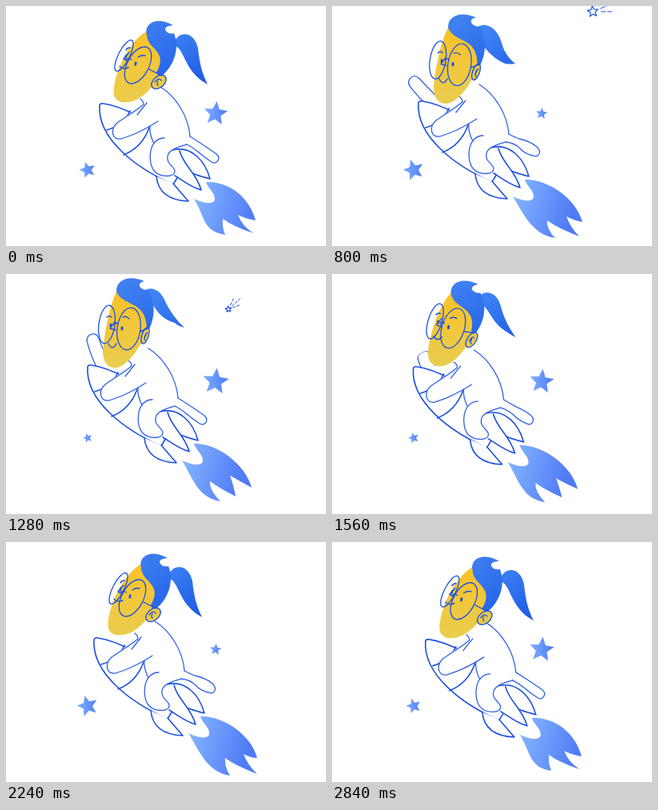
An HTML page with a canvas for the animation above (2880 ms loop, 400 by 300 pixels).

```html
<!DOCTYPE html>
<html lang="en">
<head>
<meta charset="utf-8">
<title>Rocket ride</title>
<style>
html, body { margin: 0; width: 100%; height: 100%; overflow: hidden; background: #fff; }
canvas { display: block; width: 100vw; height: 100vh; }
</style>
</head>
<body>
<canvas width="400" height="300"></canvas>
<script>
const ctx = document.querySelector('canvas').getContext('2d');
const LOOP = 2880, STEP = 40;
const KEY_TIMES = [0, 320, 800, 1280, 1840, 2240];
const DARK = '#1c50e0', LINE = '#3060e6', NUMBER = /-?\d+(\.\d+)?/g;

// Smooth periodic curve through the given values.
function curve(values, t, times = KEY_TIMES) {
  const n = times.length;
  let i = n - 1;
  while (times[i] > t) i--;
  const time = k => times[(k + n) % n] + LOOP * Math.floor(k / n);
  const value = k => values[(k + n) % n];
  const slope = k => (value(k + 1) - value(k - 1)) / (time(k + 1) - time(k - 1));
  const span = time(i + 1) - time(i), u = (t - time(i)) / span;
  const s = u * u * (3 - 2 * u);
  return value(i) * (1 - s) + value(i + 1) * s +
    span * u * (1 - u) * (slope(i) * (1 - u) - slope(i + 1) * u);
}

const clamp = v => Math.max(0, Math.min(1, v));
const lerp = (a, b, m) => a + (b - a) * m;
const numbers = path => path.match(NUMBER).map(Number);

function blend(a, b, m) {
  const target = numbers(b);
  let i = 0;
  return a.replace(NUMBER, v => lerp(+v, target[i++], m).toFixed(2));
}

function morph(poses, t) {
  const lists = poses.map(numbers);
  let i = 0;
  return poses[0].replace(NUMBER, () => {
    const v = curve(lists.map(list => list[i]), t);
    i++;
    return v.toFixed(2);
  });
}

function shape(path, fill, stroke, width = 1.3) {
  const p = new Path2D(path);
  if (fill) { ctx.fillStyle = fill; ctx.fill(p); }
  if (stroke) { ctx.strokeStyle = stroke; ctx.lineWidth = width; ctx.stroke(p); }
}

function gradient(x0, y0, x1, y1, from, to) {
  const g = ctx.createLinearGradient(x0, y0, x1, y1);
  g.addColorStop(0, from);
  g.addColorStop(1, to);
  return g;
}

function oval(a, b, m, fill, width = 1.3) {
  const [x, y, rx, ry, angle] = a.map((v, i) => lerp(v, b[i], m));
  ctx.beginPath();
  ctx.ellipse(x, y, rx, ry, angle * Math.PI / 180, 0, 7);
  if (fill) { ctx.fillStyle = fill; ctx.fill(); }
  if (width) { ctx.strokeStyle = DARK; ctx.lineWidth = width; ctx.stroke(); }
}

function star(x, y, r, degrees, outline) {
  ctx.beginPath();
  for (let i = 0; i < 10; i++) {
    const a = i * Math.PI / 5 + (degrees - 90) * Math.PI / 180;
    const d = i % 2 ? r * 0.45 : r;
    ctx.lineTo(x + d * Math.cos(a), y + d * Math.sin(a));
  }
  ctx.closePath();
  if (outline) {
    ctx.strokeStyle = DARK;
    ctx.lineWidth = 1.2;
    ctx.stroke();
  } else {
    ctx.fillStyle = gradient(x - r, y, x + r, y, '#80b2ff', '#4c7af5');
    ctx.fill();
  }
}

function twinklingStars(t) {
  const times = [...KEY_TIMES, 2720];
  star(262, 134.5, curve([15.5, 11.8, 7.5, 17, 12.5, 7.5, 17], t, times), 6);
  star(102, 205, curve([10.5, 11.8, 13.5, 6, 9.5, 13.5, 7], t, times), -16);
}

function shootingStar(t) {
  if (t < 480 || t > 1480) return;
  const u = (t - 800) / 480, x = 326 - 48 * u, y = 7 + 37 * u;
  const r = Math.max(0.5, 7 - 3 * u);
  star(x, y, r, -6, true);
  ctx.strokeStyle = DARK;
  ctx.lineWidth = 1;
  ctx.setLineDash([r * 0.8, 2.2]);
  for (const spread of [-22, 0, 22]) {
    const a = (-22 - 20 * u + spread) * Math.PI / 180;
    const c = Math.cos(a), s = Math.sin(a), end = r * (spread ? 3.6 : 5);
    ctx.beginPath();
    ctx.moveTo(x + r * 1.5 * c, y + r * 1.5 * s);
    ctx.lineTo(x + end * c, y + end * s);
    ctx.stroke();
  }
  ctx.setLineDash([]);
}

// Three flame tips and the two notches between them.
const FLAME = [
  '312 268 290 261 309 284 271 266 274 286',
  '315 273 294 264 308 291 272 271 277 291',
  '313 270 293 263 309 288 269 268 279 290',
  '307 267 280 252 287 278 255 259 268 284',
  '309 271 284 261 294 283 258 265 268 288',
  '314 270 297 265 314 290 274 270 280 292'
];

function flame(t, dx, dy) {
  const [ax, ay, bx, by, cx, cy, ex, ey, fx, fy] = numbers(morph(FLAME, t));
  const p = (x, y) => `${x + dx} ${y + dy}`;
  shape(`M${p(250, 220)} C${p(278, 219)} ${ax - 8} ${ay - 30} ${ax} ${ay}
    Q${bx + 9} ${by + 5} ${bx} ${by} Q${bx + 5} ${by + 14} ${cx} ${cy}
    Q${ex + 12} ${ey + 9} ${ex} ${ey} Q${ex - 1} ${ey + 11} ${fx} ${fy}
    C${fx - 28} ${fy - 4} ${p(249, 264)} ${p(235, 241)}
    C${p(247, 247)} ${p(261, 249)} ${p(261, 241)} C${p(261, 233)} ${p(252, 228)} ${p(250, 220)} Z`,
    gradient(235 + dx, 245 + dy, 308 + dx, 266 + dy, '#82b4ff', '#507bf5'));
}

function wavingArm(t) {
  const reach = clamp(curve([0, 0, 1, 1, 0, 0], t));
  if (reach < 0.02) return;
  ctx.save();
  ctx.translate(138, 124);
  ctx.rotate(curve([30, 30, 44, 66, 50, 30], t) * Math.PI / 180);
  ctx.scale(reach, 1);
  shape('M0 9 Q-20 10 -38 7 C-47 3 -45 -8 -36 -8 Q-18 -7 0 -7', '#fff', LINE);
  ctx.restore();
}

function rocket() {
  const hull = 'M215 213 L209 223 C163 203 114 166 117 124 Q118 121 122 122 C137 124 150 130 164 137';
  shape(hull + ' L216 181 Z', '#fff');
  shape(hull + ' M126 155 Q147 149 155 131 M147 186 Q170 177 179 152', null, DARK, 1.6);
  const fins = [
    'M208 180 C232 174 249 194 255 216 C243 213 232 210 224 203',
    'M217 181 C222 200 238 208 244 230 C230 226 221 218 211 212',
    'M188 213 C190 233 204 243 228 244 L209 222'
  ];
  fins.forEach(fin => shape(fin, '#fff', DARK, 1.6));
}

const BACK = 'M193 101 C212 113 228 137 230 163';
const LEG = 'C213 177 203 180 202 188 C200 197 210 200 211 206 C211 215 193 214 186 207 C176 196 178 165 198 165';
const FOOT_STRAIGHT = 'M230 163 Q238 168 247 174 Q256 180 263 185 C269 190 264 199 257 195 Q248 189 241 183 Q234 177 226 173';
const FOOT_BENT = 'M230 163 Q235 166 243 169 Q257 172 265 179 C272 186 267 193 260 190 Q250 188 244 181 Q237 174 226 173';

function body(t) {
  const bend = clamp(curve([0, 1, 1, 0, 1, 1], t));
  shape(`${BACK} L226 173 ${LEG} L180 150 L144 166 C132 168 130 154 139 146 C160 130 172 124 168 116 Z`, '#fff');
  shape(BACK, null, LINE);
  shape(blend(FOOT_STRAIGHT, FOOT_BENT, bend), '#fff', LINE);
  shape(`M226 173 ${LEG} M180 150 C179 158 182 166 185 172`, null, LINE);
  shape('M168 116 Q172 119 172 123 C164 130 152 137 139 146 C130 154 132 168 144 166 C156 162 168 158 190 144 M176 121 L164 136',
    null, LINE);
}

const PONY_DOWN = 'M210 46 C215 31 235 30 240 53 C242 72 245 84 252 98 Q247 95 244 93 C222 76 222 52 211 50 Z';
const PONY = [
  PONY_DOWN,
  'M194 33 C212 25 231 40 236 56 C240 68 244 74 248 81 Q242 80 240 77 C222 75 212 60 203 44 Z',
  'M187 33 C199 19 216 30 221 49 C225 63 231 69 238 75 Q231 76 225 75 C209 68 199 55 190 41 Z',
  'M187 30 C193 23 207 26 213 40 C219 54 229 67 238 75 Q230 73 226 69 C211 65 204 56 196 42 Z',
  PONY_DOWN,
  PONY_DOWN
];

// Each pair is the head looking down and the head turned to the viewer.
const FACE = [
  'M177 31 C159 40 140 70 135 101 C132 118 142 122 154 120 C171 117 182 102 193 88 L204 50 Z',
  'M153 30 C145 46 138 80 136 104 C136 120 144 127 154 125 C170 120 182 100 191 80 L196 46 Z'
];
const HAIR = [
  'M176 36 C172 22 188 12 209 24 Q198 25 199 30 Q203 36 210 34 C218 55 209 76 193 89 Q190 87 188 83 C204 56 176 54 176 36 Z',
  'M153 30 C152 16 168 8 188 17 Q179 19 183 25 Q188 29 192 28 C204 44 200 66 193 79 Q192 78 191 76 C190 40 162 50 153 30 Z'
];
const FEATURES = [
  'M165 64 Q169 61 174 62 M150 55 Q152 52 155 52 M154 58 L147 66 L153 69 M142 75 Q145 80 153 77 M179 79 L194 87 M150 67 Q153 64 157 67',
  'M161 62 Q165 60 169 64 M141 62 Q144 59 147 62 M151 68 L145 76 L152 78 M143 95 Q148 105 153 95 M183 80 L192 76 M151 71 Q153 67 155 71'
];

function head(t) {
  const turn = clamp(curve([0, 0.6, 0.95, 1, 0, 0], t));
  const pair = ([down, front]) => blend(down, front, turn);
  ctx.save();
  ctx.translate(0, curve([0, 0, 0, 0, -3, -2], t));
  shape(pair(FACE), gradient(0, 40, 0, 124, '#f8c32b', '#e9cd50'));
  shape(morph(PONY, t), gradient(205, 32, 245, 94, '#3f84f5', '#1f5ce6'));
  shape(pair(HAIR), gradient(170, 20, 205, 80, '#3f80f0', '#2766ea'));
  oval([191, 95, 7, 10.5, 50], [189, 85, 4.2, 10.5, 18], turn, '#ebca48');
  shape(blend('M186 95 Q191 89 194 93 M190 94 Q188 97 190 99',
    'M188 88 Q190 80 192 82 M190 84 Q187 88 189 91', turn), null, DARK);
  oval([147.5, 62, 7, 21.5, 27], [141, 71, 10, 24, 8], turn);
  oval([165, 74, 13.5, 25, 28], [168.5, 76.5, 14.5, 26.5, 8], turn);
  oval([162, 72, 1.5, 2.8, 10], [160, 76, 1.6, 2.7, 0], turn, DARK, 0);
  oval([150, 63, 1.3, 2.5, 10], [146, 72, 1.5, 2.6, 0], turn, DARK, 0);
  shape(pair(FEATURES), null, DARK, 1.4);
  ctx.restore();
}

function draw(now) {
  const t = Math.floor(now % LOOP / STEP) * STEP;
  const dx = curve([0, -4, -9, -15, -14, -7], t);
  const dy = curve([0, 2, -3, -8, -3, -2], t);
  ctx.fillStyle = '#fff';
  ctx.fillRect(0, 0, 400, 300);
  ctx.lineCap = ctx.lineJoin = 'round';
  shootingStar(t);
  twinklingStars(t);
  flame(t, dx, dy);
  ctx.save();
  ctx.translate(dx, dy);
  wavingArm(t);
  rocket();
  body(t);
  head(t);
  ctx.restore();
}

let start;
function tick(now) {
  start ??= now;
  draw(now - start);
  requestAnimationFrame(tick);
}
draw(0);
requestAnimationFrame(tick);
</script>
</body>
</html>
```
